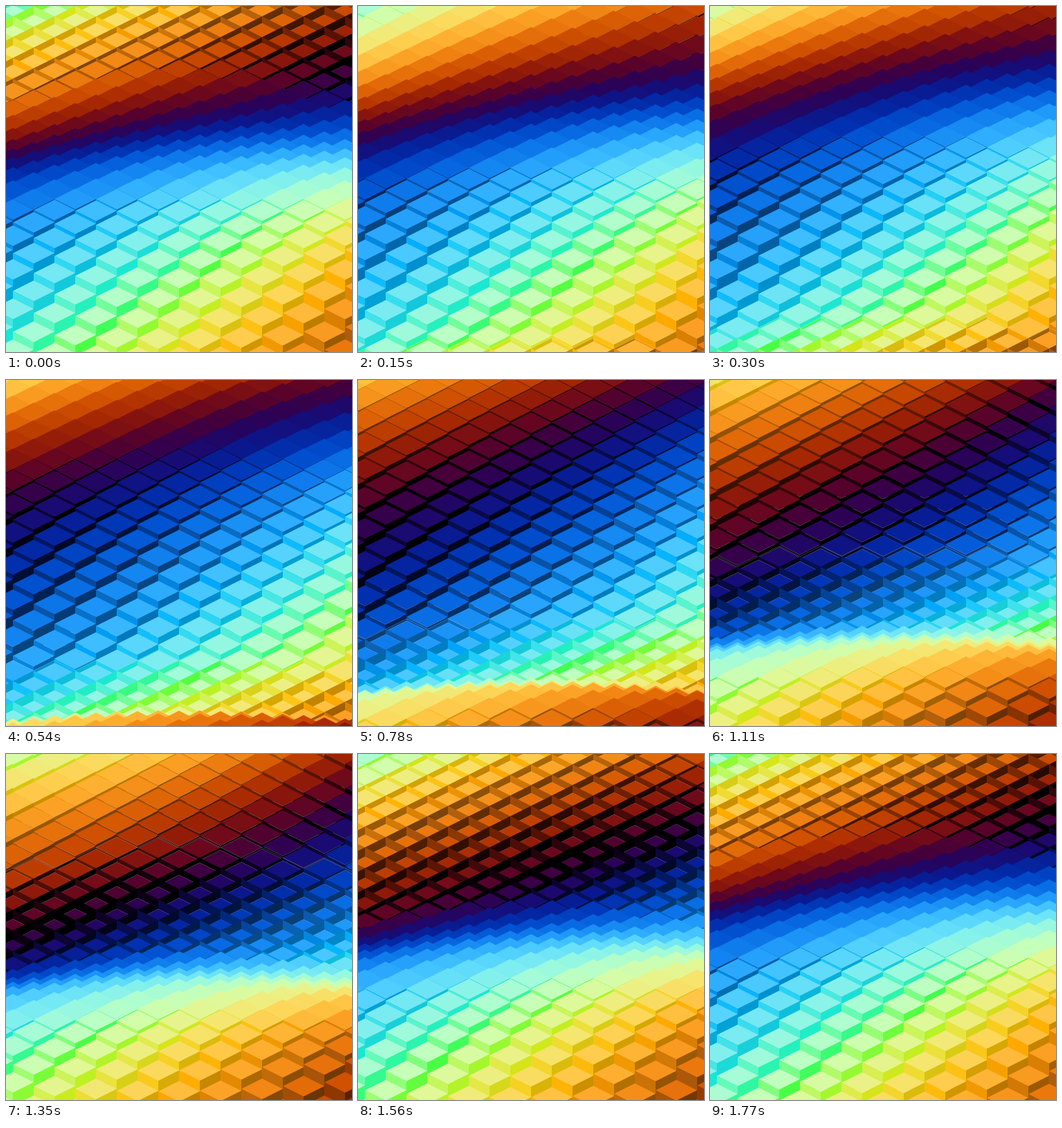
These frames come from a looping animation (500x500 px, 1.8 s). An HTML page with a canvas:

```html
<!DOCTYPE html>
<html lang="en">
<head>
<meta charset="utf-8">
<title>Block wave</title>
<style>
  html, body { margin: 0; width: 100%; height: 100%; overflow: hidden; background: #fff; }
  canvas { display: block; width: 500px; height: 500px; }
</style>
</head>
<body>
<canvas id="stage" width="500" height="500"></canvas>
<script>
const ctx = document.getElementById('stage').getContext('2d');
const LOOP = 1800, STEP = 30;
const W = 30, D = 15;              // half width and half depth of a tile
const BASE = 41, SWING = 55;       // block height: mean and amplitude
const CREST = 785;                 // time of the crest at the origin tile
const TAU = Math.PI * 2;

const wave = a => 0.5 + 0.5 * Math.cos(TAU * a);
const palette = p => [wave(p - 0.363), wave(p - 0.53), wave(p - 0.697)];

// Lower the HSL lightness, keeping hue and saturation.
function darker(rgb, amount) {
  const hi = Math.max(...rgb), lo = Math.min(...rgb);
  const l = (hi + lo) / 2;
  const sat = (hi - lo) / (1 - Math.abs(2 * l - 1) || 1);
  const l2 = Math.max(0, l - amount);
  const chroma = sat * (1 - Math.abs(2 * l2 - 1));
  return rgb.map(v => l2 + (v - l) / (hi - lo || 1) * chroma);
}

const css = rgb => 'rgb(' + rgb.map(v => Math.round(v * 255)).join(',') + ')';

// Tiles from back to front; u counts rows, v counts columns.
const tiles = [];
for (let u = -3; u <= 44; u++) {
  for (let v = -10; v <= 10; v++) {
    if ((u + v) & 1) continue;
    const x = 250 + W * v, y = -30 + D * u;
    const s = (y - 276 + 0.345 * x) / 545;
    const rgb = palette(s * (0.1 * s - 1.06));
    tiles.push({
      x, y,
      lag: (u * u - v * v) / 4 / 400,
      top: css(rgb),
      left: css(darker(rgb, 0.13)),
      right: css(darker(rgb, 0.24))
    });
  }
}

function face(color, ...pts) {
  ctx.fillStyle = color;
  ctx.beginPath();
  for (let k = 0; k < pts.length; k += 2) ctx.lineTo(pts[k], pts[k + 1]);
  ctx.closePath();
  ctx.fill();
}

function wall(color, x1, y1, x2, y2, h) {
  face(color, x1, y1, x2, y2, x2, y2 - h, x1, y1 - h);
}

function block(b, time) {
  const h = BASE + SWING * Math.cos(TAU * ((time - CREST) / LOOP + b.lag));
  const { x, y } = b, t = y - h;
  face(b.top, x - W, t, x, t - D, x + W, t, x, t + D);
  // A raised block shows its front walls, a sunken one its back walls.
  const edge = h > 0 ? y + D : y - D;
  const [west, east] = h > 0 ? [b.left, b.right] : [b.right, b.left];
  wall(west, x - W, y, x, edge, h);
  wall(east, x, edge, x + W, y, h);
}

function draw(time) {
  ctx.fillStyle = '#fff';
  ctx.fillRect(0, 0, 500, 500);
  for (const b of tiles) block(b, time);
}

const start = performance.now();
function tick() {
  const time = (performance.now() - start) % LOOP;
  draw(Math.floor(time / STEP) * STEP);
  requestAnimationFrame(tick);
}
tick();
</script>
</body>
</html>
```
